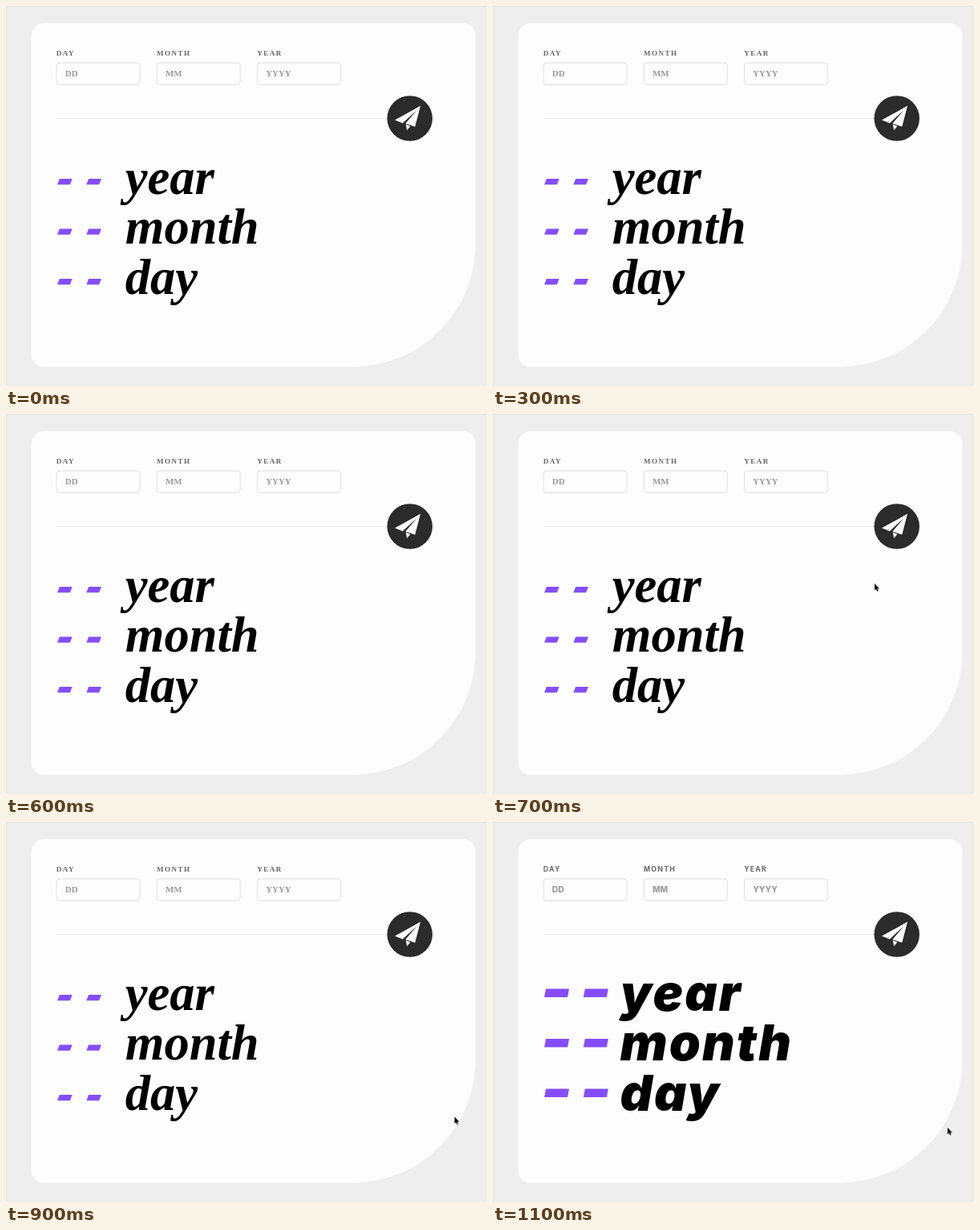
An HTML page that plays this animation: 600x475 px, repeating every 1200 ms.

```html
<!DOCTYPE html>
<html lang="en">
<head>
<meta charset="utf-8">
<title>Age calculator</title>
<style>
  html, body { margin: 0; width: 100%; height: 100%; overflow: hidden; background: #eee; }
  svg { display: block; width: 600px; height: 475px; }
  text { white-space: pre; }
  .label { fill: #666; }
  .hint { fill: #9b9b9b; }
  .dash { fill: #854dff; }
  .serif { font-family: "Liberation Serif", serif; font-weight: 700; }
  .serif .label { font-size: 9px; letter-spacing: 1.5px; }
  .serif .hint { font-size: 10.9px; }
  .serif .unit { font-size: 62.5px; font-style: italic; }
  .sans { font-family: Inter, sans-serif; }
  .sans .label { font-size: 8.7px; font-weight: 700; letter-spacing: 1.25px; }
  .sans .hint { font-size: 10.2px; font-weight: 800; }
  .sans .unit { font-size: 62.5px; font-weight: 900; font-style: italic; letter-spacing: 2.2px; }
</style>
</head>
<body>
<svg viewBox="0 0 600 475">
  <rect width="600" height="475" fill="#eee"/>
  <path d="M0 .5H600M.5 0V475" stroke="#e2e2e2"/>
  <path fill="#fdfdfd" d="M47 21.5H570a15.5 15.5 0 0 1 15.5 15.5V298A153 153 0 0 1 432.5 451H47a15.5 15.5 0 0 1-15.5-15.5V37A15.5 15.5 0 0 1 47 21.5Z"/>
  <g id="boxes" fill="#fdfdfd" stroke="#dedede"></g>
  <path d="M63 140.5H476" stroke="#e9e9e9"/>
  <circle cx="503.7" cy="140.5" r="28.3" fill="#2b2b2b"/>
  <path fill="#fff" d="M517 124.8L485 142.4L494.8 146.6L512.5 130L498.3 147L510.3 150.8ZM498.7 148L500.2 155.2L504.4 150.2Z"/>
  <g id="serif" class="serif"></g>
  <g id="sans" class="sans"></g>
  <path id="cursor" d="M0 0V8.4L1.9 6.7L3.2 9.7L4.6 9L3.4 6.2H6Z" fill="#000" stroke="#fff" stroke-width=".8" paint-order="stroke"/>
</svg>
<script>
  const LOOP = 1200, STEP = 100, COLUMN = 125.2, LINE = 62.5, LEFT = 62.8;
  const fields = [["DAY", "DD"], ["MONTH", "MM"], ["YEAR", "YYYY"]];
  const units = ["year", "month", "day"];
  const path = [[476, 212], [530, 314], [559.5, 368.5], [560, 369.5], [567, 382]];
  const $ = id => document.getElementById(id);

  const text = (kind, x, y, value) => `<text class="${kind}" x="${x}" y="${y}">${value}</text>`;
  const dash = (x, y, { width, height, slant }) =>
    `<path class="dash" d="M${x} ${y}l${slant} ${-height}h${width}l${-slant} ${height}z"/>`;

  function fill(id, { unitX, baseline, dashY, gap, shape }) {
    const form = fields.map(([name, hint], i) =>
      text("label", LEFT + i * COLUMN, 62.2, name) +
      text("hint", LEFT + 11 + i * COLUMN, 88.3, hint));
    const result = units.map((unit, i) => {
      const y = dashY + i * LINE;
      return dash(64, y, shape) + dash(64 + gap, y, shape) +
        text("unit", unitX, baseline + i * LINE, unit);
    });
    $(id).innerHTML = form.concat(result).join("");
  }

  $("boxes").innerHTML = fields.map((_, i) =>
    `<rect x="${63 + i * COLUMN}" y="71" width="104" height="27.5" rx="4"/>`).join("");

  fill("serif", { unitX: 148.8, baseline: 234.7, dashY: 223.3, gap: 36.3,
    shape: { width: 15.8, height: 7.4, slant: 2.8 } });
  fill("sans", { unitX: 158.5, baseline: 235.6, dashY: 219, gap: 48.8,
    shape: { width: 29, height: 10.4, slant: 2 } });

  // The web font swaps in late, shortly before the loop ends.
  function draw() {
    const t = performance.now() % LOOP;
    const loaded = t >= 1000;
    const point = path[Math.floor(t / STEP) - 7];
    $("serif").style.display = loaded ? "none" : "";
    $("sans").style.display = loaded ? "" : "none";
    $("cursor").style.display = point ? "" : "none";
    if (point) $("cursor").setAttribute("transform", `translate(${point})`);
    requestAnimationFrame(draw);
  }
  draw();
</script>
</body>
</html>
```
